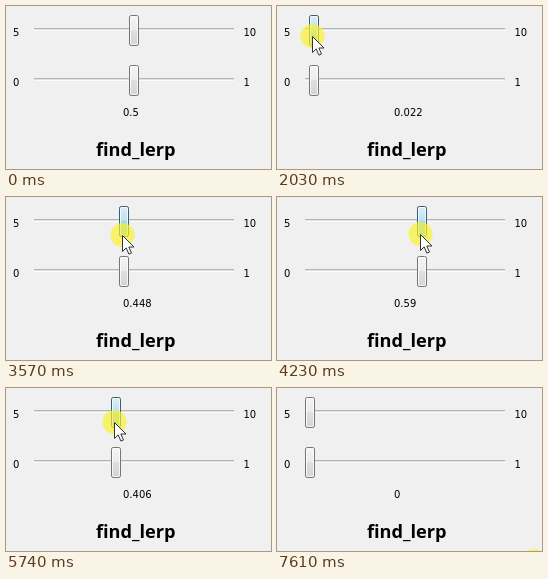
An HTML page that plays this animation: 265x163 px, repeating every 7710 ms.

```html
<!DOCTYPE html>
<html lang="en">
<head>
<meta charset="utf-8">
<title>find_lerp</title>
<style>
  html, body { margin: 0; width: 100%; height: 100%; overflow: hidden; background: #f0f0f0; }
  svg { display: block; width: 265px; height: 163px; }
  text { font: 10px "DejaVu Sans", sans-serif; fill: #000; }
  .title { font: 700 18.2px "Open Sans", "Noto Sans", sans-serif; }
  #halo { fill: #faf22c; fill-opacity: .68; }
</style>
</head>
<body>
<svg viewBox="0 0 265 163">
  <defs>
    <linearGradient id="normal" x2="0" y2="1">
      <stop stop-color="#f4f4f4"/><stop offset=".5" stop-color="#ebebeb"/>
      <stop offset=".5" stop-color="#e0e0e0"/><stop offset="1" stop-color="#d4d4d4"/>
    </linearGradient>
    <linearGradient id="hot" x2="0" y2="1">
      <stop stop-color="#eaf6fd"/><stop offset=".5" stop-color="#d7effc"/>
      <stop offset=".5" stop-color="#bde6fd"/><stop offset="1" stop-color="#a9dbf6"/>
    </linearGradient>
    <linearGradient id="down" x2="0" y2="1">
      <stop stop-color="#dceff9"/><stop offset=".5" stop-color="#b8dff4"/>
      <stop offset=".5" stop-color="#a4d6f0"/><stop offset="1" stop-color="#8cc8e6"/>
    </linearGradient>
    <g id="track">
      <rect x="28" y="22" width="200" height="1" fill="#b2b5b2"/>
      <rect x="28" y="23" width="200" height="1" fill="#dfe3df"/>
      <rect x="28" y="24" width="200" height="1" fill="#fcfcfc"/>
    </g>
    <g id="knob">
      <rect x=".5" y=".5" width="9" height="30" rx="1.8"/>
      <rect x="1.5" y="1.5" width="7" height="28" rx="1" fill="none" stroke="#fff" stroke-opacity=".75"/>
    </g>
  </defs>
  <rect width="265" height="163" fill="#f0f0f0"/>
  <use href="#track"/>
  <use href="#track" y="50"/>
  <text x="7" y="30">5</text><text x="237.5" y="30">10</text>
  <text x="7" y="80">0</text><text x="237.5" y="80">1</text>
  <text id="value" x="117" y="110">0.5</text>
  <text class="title" x="90" y="150">find_lerp</text>
  <use id="top" href="#knob" y="9"/>
  <use id="low" href="#knob" y="59" fill="url(#normal)" stroke="#747676"/>
  <circle id="halo" r="12"/>
  <path id="arrow" d="M-.5 .5v16l3.7-3.6 2.7 6.2 2.6-1.1-2.7-6h5.2z" fill="#fff" stroke="#333" stroke-width="1"/>
</svg>
<script>
const LOOP = 7710, PRESS = 830, RELEASE = 6380, BLUR = 7610;
const $ = id => document.getElementById(id);

// Pointer path: time, x, y
const path = [
  [80, 197, 137], [400, 111, 37], [560, 127, 33], [1190, 127, 33],
  [1950, 27, 30], [2030, 36, 30], [2680, 211, 37], [2780, 227, 37],
  [2930, 243, 37], [3570, 117, 38], [3790, 93, 38], [4360, 158, 37],
  [4830, 184, 37], [5140, 222, 36], [5300, 237, 35], [5740, 109, 34],
  [5920, 60, 30], [6150, 15, 27], [6790, 15, 27], [7250, 206, 170]
];

// Slope at a key: zero at turning points, harmonic mean elsewhere
function slope(i, k) {
  if (i === 0 || i === path.length - 1) return 0;
  const [a, b, c] = path.slice(i - 1, i + 2);
  const l = (b[k] - a[k]) / (b[0] - a[0]);
  const r = (c[k] - b[k]) / (c[0] - b[0]);
  return l * r > 0 ? 2 * l * r / (l + r) : 0;
}

function pointer(t, k) {
  const last = path.length - 1;
  if (t <= path[0][0]) return path[0][k];
  if (t >= path[last][0]) return path[last][k];
  const i = path.findIndex(p => p[0] > t) - 1;
  const a = path[i], b = path[i + 1], d = b[0] - a[0];
  const u = (t - a[0]) / d, v = 1 - u;
  return a[k] * (1 + 2 * u) * v * v + slope(i, k) * d * u * v * v
    + b[k] * u * u * (3 - 2 * u) - slope(i + 1, k) * d * u * u * v;
}

function place(el, x, y) {
  el.setAttribute("transform", `translate(${x} ${y})`);
}

function skin(t) {
  if (t >= PRESS && t < RELEASE) return ["down", "#3c5d6d"];
  if (t >= 460 && t < BLUR) return ["hot", "#4c7f9c"];
  return ["normal", "#747676"];
}

function draw(t) {
  const x = Math.round(pointer(t, 1)), y = Math.round(pointer(t, 2));
  const held = t >= PRESS && t < RELEASE, outside = t >= BLUR;

  const dragX = t < PRESS ? 127 : t < RELEASE ? x : 15;
  const px = Math.max(0, Math.min(190, dragX - 32));
  $("value").textContent = String(Math.round(px / 190 * 500) / 500);
  $("top").setAttribute("x", 28 + px);
  $("low").setAttribute("x", 28 + px);

  const [fill, line] = skin(t);
  $("top").setAttribute("fill", `url(#${fill})`);
  $("top").setAttribute("stroke", line);

  $("arrow").style.display = t >= 80 && t < 7250 ? "" : "none";
  place($("arrow"), x, y);
  $("halo").style.display = held || outside ? "" : "none";
  if (outside) place($("halo"), 257, 173);
  else place($("halo"), x - .5, y);
}

const start = performance.now();
function tick() {
  draw((performance.now() - start) % LOOP);
  requestAnimationFrame(tick);
}
draw(0);
requestAnimationFrame(tick);
</script>
</body>
</html>
```
